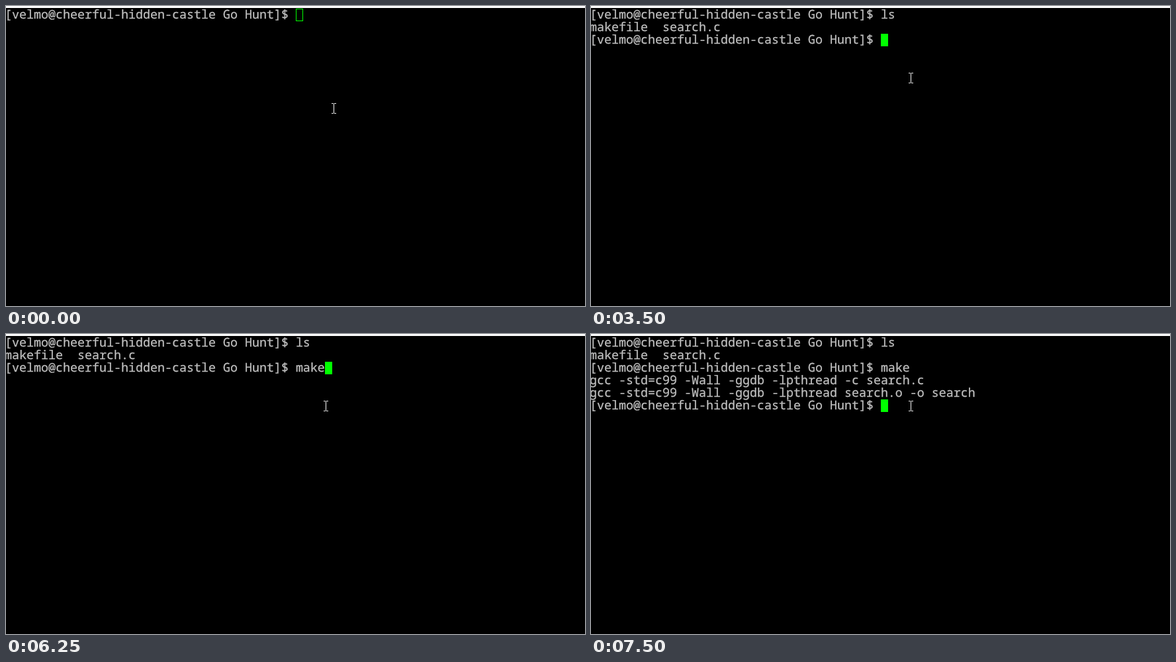
Recreate the animation shown at these times as an HTML page. Size 875 px wide and 454 px high, loop 8000 ms.

```html
<!DOCTYPE html>
<html lang="en">
<head>
<meta charset="utf-8">
<title>Terminal session</title>
<style>
  html, body { margin: 0; width: 100%; height: 100%; overflow: hidden; background: #000; }
  svg { display: block; width: 875px; height: 454px; }
  text {
    font: 18.3333px "Noto Sans Mono", "DejaVu Sans Mono", monospace;
    fill: #bfbfbf;
    stroke: #bfbfbf;
    stroke-width: 0.3px;
    white-space: pre;
    text-rendering: geometricPrecision;
  }
</style>
</head>
<body>
<svg viewBox="0 0 875 454" shape-rendering="crispEdges">
  <rect width="875" height="454" fill="#000"/>
  <rect width="875" height="3" fill="#fff"/>
  <g id="lines"></g>
  <rect id="cursor"/>
  <path id="pointer" d="M-3 -7.5h3M1 -7.5h3M.5 -7v14M-3 7.5h3M1 7.5h3" stroke="#fff" fill="none"/>
</svg>
<script>
const LOOP = 8000;
const CELL = { x: -2, y: 4, w: 11, h: 19 };
const PROMPT = "[velmo@cheerful-hidden-castle Go Hunt]$ ";
const BUILD = "gcc -std=c99 -Wall -ggdb -lpthread ";

const lines = document.getElementById("lines");
const cursor = document.getElementById("cursor");
const pointer = document.getElementById("pointer");

const setAttrs = (el, attrs) => {
  for (const name in attrs) el.setAttribute(name, attrs[name]);
};

const rows = Array.from({ length: 6 }, (_, row) => {
  const el = document.createElementNS("http://www.w3.org/2000/svg", "text");
  setAttrs(el, { x: CELL.x, y: CELL.y + row * CELL.h + 15 });
  return lines.appendChild(el);
});

// Part of a command typed so far, given the time of each keystroke
const typed = (command, times, t) =>
  command.slice(0, times.filter(time => t >= time).length);

function screenAt(t) {
  const screen = [PROMPT + typed("ls", [3000, 3250], t)];
  if (t >= 3500) {
    screen.push("makefile  search.c");
    screen.push(PROMPT + typed("make", [4750, 5250, 5750, 6250], t));
  }
  if (t >= 6750) {
    screen.push(BUILD + "-c search.c", BUILD + "search.o -o search");
    screen.push(t >= 7000 ? PROMPT : "");
  }
  return screen;
}

function drawCursor(row, col, focused) {
  const inset = focused ? 0 : 0.5;
  setAttrs(cursor, {
    x: CELL.x + col * CELL.w + inset,
    y: CELL.y + row * CELL.h + inset,
    width: CELL.w - 2 * inset,
    height: CELL.h - 2 * inset,
    fill: focused ? "#0f0" : "none",
    stroke: focused ? "none" : "#0f0"
  });
}

function draw(t) {
  const screen = screenAt(t);
  rows.forEach((el, row) => {
    const content = screen[row] || "";
    if (el.textContent !== content) el.textContent = content;
  });
  const last = screen.length - 1;
  drawCursor(last, screen[last].length, t >= 750);
  const [x, y] = t < 250 ? [495, 155] : [483, 109];
  pointer.setAttribute("transform", `translate(${x} ${y})`);
}

const start = performance.now();
function tick() {
  draw((performance.now() - start) % LOOP);
  requestAnimationFrame(tick);
}
tick();
</script>
</body>
</html>
```
